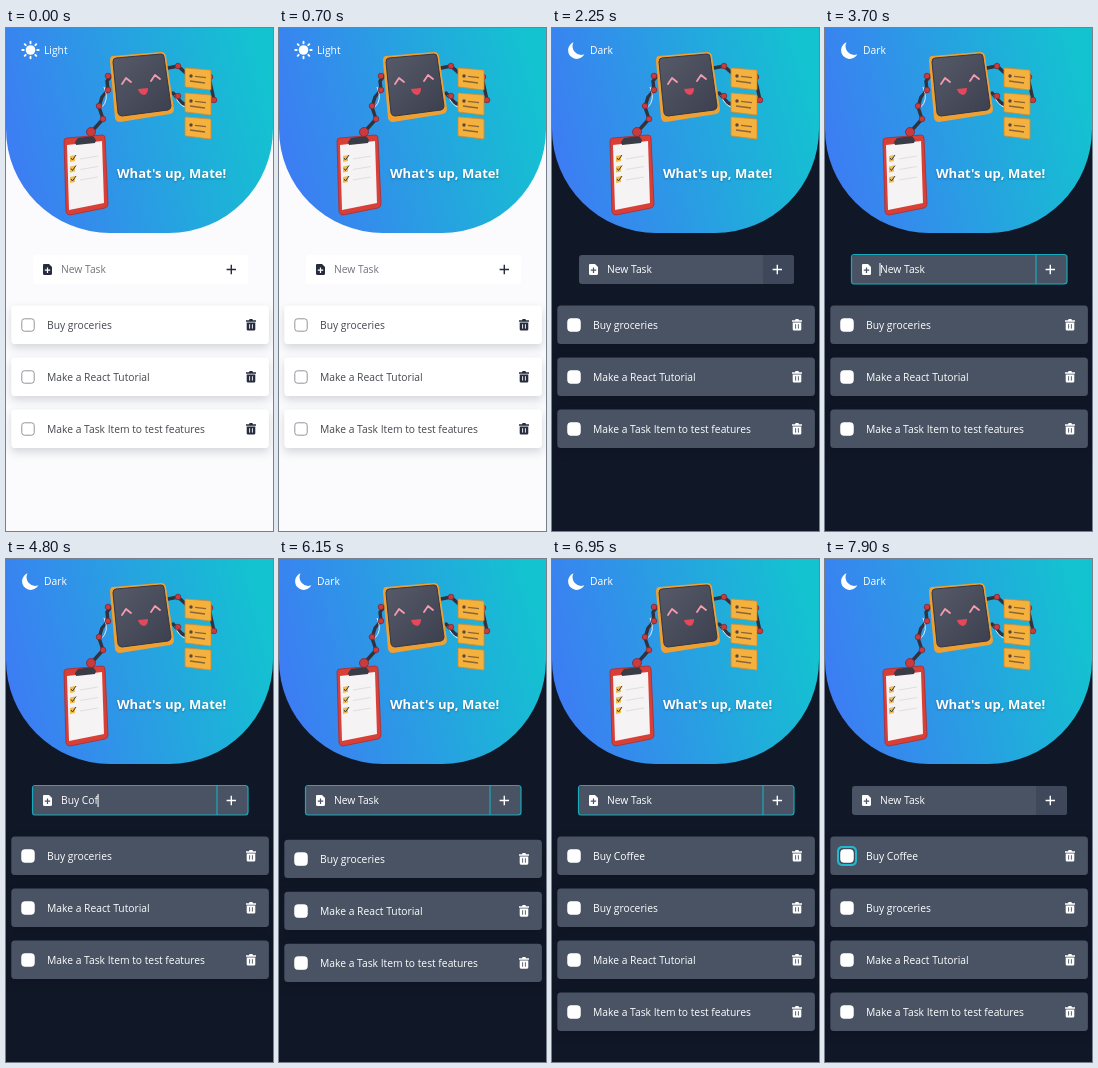
Recreate the animation shown at these times as an HTML page. Size 267 px wide and 503 px high, loop 8 s.

```html
<!DOCTYPE html>
<html lang="en">
<head>
<meta charset="utf-8">
<title>Task list</title>
<style>
html, body { margin: 0; width: 100%; height: 100%; overflow: hidden; }
svg { display: block; width: 267px; height: 503px; background: var(--page); }
text { font: 10.3px "Open Sans", "Noto Sans", sans-serif; fill: #fff; white-space: pre; }
.title { font-weight: 700; font-size: 13.05px; filter: drop-shadow(0 1px 1px #0004); }
.card { fill: var(--card); }
.raised { filter: drop-shadow(0 4px 4px var(--shadow)); }
.label { fill: var(--text); }
.icon { fill: var(--icon); }
.hole { stroke: var(--card); fill: none; }
.box { fill: #fff; stroke: var(--box); }
.arm { fill: none; stroke: #30323d; stroke-width: 3.4; stroke-linecap: round; stroke-linejoin: round; }
.joint { fill: #c93b3c; stroke: #7d2a33; stroke-width: .8; }
</style>
</head>
<body>
<svg viewBox="0 0 267 503">
  <defs>
    <linearGradient id="sky" x1="0" y1=".6" x2="1" y2=".4">
      <stop stop-color="#3d7cf4"/><stop offset="1" stop-color="#13c3d0"/>
    </linearGradient>
    <linearGradient id="screen" x2="1" y2="1">
      <stop stop-color="#565a69"/><stop offset="1" stop-color="#3c404e"/>
    </linearGradient>
    <g id="trash">
      <path class="icon" d="M-5-4.8H-2L-1.4-6H1.4L2-4.8H5V-3.2H-5ZM-4.3-2.6H4.3V4.2Q4.3 5.6 3 5.6H-3Q-4.3 5.6-4.3 4.2Z"/>
      <path class="hole" d="M-1.4-.8V3.6M1.4-.8V3.6" stroke-width=".9"/>
    </g>
    <g id="note">
      <path d="M1 0 25 2Q26 2 26 3V21Q26 22 25 22L1 19Q0 19 0 18V1Q0 0 1 0Z" fill="#f4b13d" stroke="#d98a2b" stroke-width=".8"/>
      <circle cx="6" cy="8" r="1.7" fill="#5a4640"/>
      <path d="M10 8.3 21 9.7M5 13 20 15" stroke="#8b6437" stroke-width="1.3"/>
    </g>
  </defs>

  <path d="M0 0H267V101A104 104 0 0 1 163 205H104A104 104 0 0 1 0 101Z" fill="url(#sky)"/>
  <g id="sun" fill="#fff">
    <circle cx="24.5" cy="22" r="4.8"/>
    <path id="rays" stroke="#fff" stroke-width="1.9" stroke-linecap="round"/>
  </g>
  <path id="moon" d="M21.5 14.3A8.6 8.6 0 1 0 32.3 26.3A8.7 8.7 0 0 1 21.5 14.3Z" fill="#fff"/>
  <text id="mode" x="38" y="26"></text>
  <rect id="tap" x="13" y="11" width="52" height="22" fill="#3fc0f0"/>

  <g id="robot">
    <path class="arm" d="M106 47 101 53 102 62 96 69 93 79 97 91 88 101"/>
    <path class="arm" d="M162 40 172 38 182 47M167 65 176 75 190 79 208 72 203 49"/>
    <path d="M98 59Q104 72 95 80M169 67Q172 77 181 80" fill="none" stroke="#e9edf2"/>
    <g id="joints"></g>
    <path d="M107 28 155 24Q159 24 160 28L168 81Q168 85 164 86L114 94Q110 94 109 90L104 33Q104 28 107 28Z" fill="#efa033"/>
    <path d="M110 30 155 26Q158 26 158 29L165 78Q165 81 162 82L116 88Q113 88 112 85L107 34Q107 30 110 30Z" fill="url(#screen)" stroke="#343744"/>
    <path d="M116 56 120 50 125 54M145 53 149 47 154 51" fill="none" stroke="#f49bb0" stroke-width="1.8" stroke-linecap="round" stroke-linejoin="round"/>
    <path d="M132 61 142 60Q142 66 138 67Q133 66 132 61Z" fill="#e5475b"/>
    <use href="#note" x="179" y="40"/><use href="#note" x="179" y="65"/><use href="#note" x="179" y="89"/>
    <path d="M61 110 96 107Q99 107 99 110L102 176Q102 179 99 180L64 187Q61 187 60 184L58 113Q58 110 61 110Z" fill="#d83f37" stroke="#a92c32" stroke-width=".8"/>
    <path d="M61 117 96 113 98 175 63 182Z" fill="#f5f3f3"/>
    <path d="M69 114 72 110 87 108 90 112 89 115 70 117Z" fill="#393b47"/>
    <circle class="joint" cx="85" cy="104" r="4.5"/>
    <g id="checks"></g>
  </g>
  <text class="title" x="111" y="150">What's up, Mate!</text>

  <rect class="card" x="27" y="227" width="215" height="29" rx="3"/>
  <path id="add" d="M211 227H239Q242 227 242 230V253Q242 256 239 256H211Z"/>
  <path id="focus" d="M211 227V256M29 226.5H239Q242 226.5 242 229.5V253Q242 256 239 256H29Q26.5 256 26.5 253V229.5Q26.5 226.5 29 226.5Z" fill="none" stroke="#18a9ba" stroke-width="1.2"/>
  <path class="icon" d="M38 236H43L46 239V245.5Q46 247 44.5 247H38.5Q37 247 37 245.5V237Q37 236 38 236Z"/>
  <path class="hole" d="M41.5 239.5V245M38.8 242.2H44.2" stroke-width="1.2"/>
  <path d="M225.3 236.8V246.2M220.6 241.5H230" stroke="var(--icon)" stroke-width="1.4"/>
  <text id="field" x="55" y="245"></text>
  <rect id="caret" y="235" width="1" height="13" fill="#fff"/>
  <g id="list"></g>
</svg>
<script>
const $ = id => document.getElementById(id);
const LOOP = 8000, PITCH = 52;
const THEME = {
  page: [[251, 251, 253], [16, 23, 38]],
  card: [[255, 255, 255], [73, 83, 100]],
  button: [[255, 255, 255], [62, 72, 90]],
  text: [[68, 71, 78], [255, 255, 255]],
  hint: [[112, 116, 124], [255, 255, 255]],
  icon: [[38, 44, 62], [255, 255, 255]],
  box: [[145, 148, 154], [255, 255, 255]],
  shadow: [[212, 214, 219], [14, 20, 34]]
};

const clamp = x => Math.max(0, Math.min(1, x));
const progress = (t, start, length) => clamp((t - start) / length);
const smooth = x => x * x * (3 - 2 * x);
const show = (el, on) => el.setAttribute("visibility", on ? "visible" : "hidden");

$("rays").setAttribute("d", Array.from({ length: 8 }, (_, i) => {
  const a = i * Math.PI / 4, at = r => `${24.5 + r * Math.cos(a)} ${22 + r * Math.sin(a)}`;
  return `M${at(6.8)}L${at(8.2)}`;
}).join(""));

$("joints").innerHTML = [[102, 48], [102, 62], [93, 78], [97, 91], [172, 38], [172, 68], [208, 72], [204, 49]]
  .map(([x, y]) => `<circle class="joint" cx="${x}" cy="${y}" r="2.8"/>`).join("");

$("checks").innerHTML = [0, 1, 2].map(i => `<g transform="translate(64 ${127 + i * 10.5})">
  <path d="M0 1 5 0V6L0 7Z" fill="#f0bd50"/>
  <path d="M1 3 2.5 5 6 0" fill="none" stroke="#3e3a3f"/>
  <path d="M10 4 28 1" stroke="#e2dedf" stroke-width="1.2"/></g>`).join("");

// Each row is drawn around its own centre.
$("list").innerHTML = ["Buy Coffee", "Buy groceries", "Make a React Tutorial", "Make a Task Item to test features"]
  .map((name, i) => `<g>
  <rect class="card raised" x="-128.7" y="-19.4" width="257.6" height="38.4" rx="3.5"/>
  ${i ? "" : `<g id="ring"><rect x="-122" y="-10" width="20" height="20" rx="5" fill="#22b8ce"/>
    <rect x="-120" y="-8" width="16" height="16" rx="4" fill="#3c4a5c"/></g>`}
  <rect class="box" x="-118.2" y="-6.2" width="12.4" height="12.4" rx="2.6"/>
  <text class="label" x="-93" y="4">${name}</text>
  <use href="#trash" x="111"/></g>`).join("");
const [added, ...rows] = $("list").children;

function place(row, y, scale = 1) {
  row.setAttribute("transform", `translate(134 ${y}) scale(${scale})`);
}

function drawTheme(t) {
  const dark = smooth(progress(t, 1800, 300)), toggled = t >= 1750;
  for (const [name, [a, b]] of Object.entries(THEME)) {
    const mixed = a.map((v, i) => Math.round(v + (b[i] - v) * dark));
    document.documentElement.style.setProperty("--" + name, `rgb(${mixed})`);
  }
  $("mode").textContent = toggled ? "Dark" : "Light";
  show($("sun"), !toggled);
  show($("moon"), toggled);
  $("tap").setAttribute("opacity", t < 1680 ? 0 : 0.5 * (1 - progress(t, 1850, 200)));
}

function drawField(t) {
  const focused = t >= 3250 && t < 7250, editing = focused && t < 5950;
  const count = editing ? Math.max(0, Math.min(10, Math.floor((t - 3750) / 150))) : 0;
  const field = $("field");
  field.textContent = count ? "Buy Coffee".slice(0, count) : "New Task";
  field.style.fill = count ? "var(--text)" : "var(--hint)";
  show($("focus"), focused);
  $("add").style.fill = focused ? "var(--card)" : "var(--button)";
  const idle = t < 3900 ? t - 3250 : Math.max(0, t - 5250);
  show($("caret"), editing && idle % 1000 < 500);
  const width = count ? field.getComputedTextLength() : 0;
  $("caret").setAttribute("x", 54.5 + width);
}

function drawList(t) {
  const p = smooth(progress(t, 6092, 400));
  rows.forEach((row, i) => place(row, 297 + PITCH * (i + p)));
  place(added, 297 + 44 * (1 - p), p);
  added.setAttribute("opacity", p);
  show(added, p > 0);
  show($("ring"), t >= 7250);
}

function frame(now) {
  const t = now % LOOP;
  drawTheme(t);
  drawField(t);
  drawList(t);
  requestAnimationFrame(frame);
}
frame(0);
</script>
</body>
</html>
```
